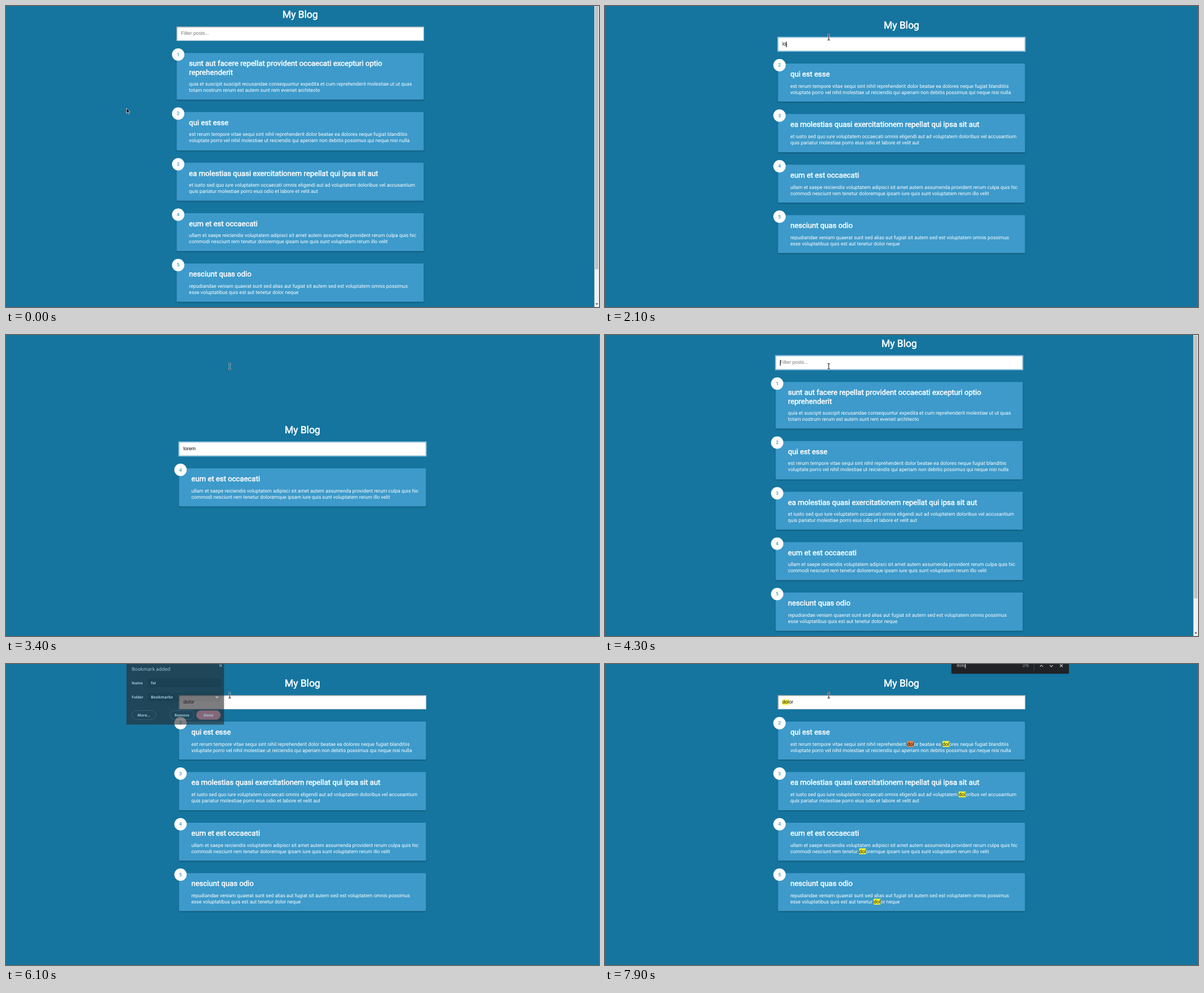
These frames come from a looping animation (1051x533 px, 8 s). An HTML page:

```html
<!DOCTYPE html>
<html lang="en">
<head>
<meta charset="utf-8">
<title>My Blog</title>
<style>
  :root { --bg: #15759f; --card: #3d9aca; --dark: #27282c; }
  * { box-sizing: border-box; }
  html, body { margin: 0; width: 100%; height: 100%; overflow: hidden; background: var(--bg); }

  /* laid out at 1920px wide, then scaled to the stage */
  #view {
    position: absolute; left: 0; top: 0; width: 1920px; height: 974px; overflow: hidden;
    transform: scale(.547396); transform-origin: 0 0;
    color: #fff; background: var(--bg);
    font: 16px Roboto, sans-serif; text-rendering: geometricPrecision;
  }
  #view > * { position: absolute; }

  #page { left: 0; top: 0; width: 800px; }
  h1, h2 { margin: 0; font-weight: 400; }
  h1 {
    padding-top: 9.5px; height: 47px; font-size: 32px; line-height: 37.5px;
    text-align: center; -webkit-text-stroke: 1.04px #fff;
  }
  #filter {
    display: flex; align-items: center; height: 45px; margin-top: 20px; padding: 0 12px;
    background: #fff; border: 2px solid; border-color: #9a9a9a #e4e4e4 #e4e4e4 #9a9a9a;
    color: #000; font: 16px/18px "Liberation Sans", Arial, sans-serif;
  }
  #filter.focus { border-color: #a9c6d8; box-shadow: 0 0 0 2px #5fa9d3; }
  #hint { color: #757575; }
  .typo { text-decoration: underline wavy #e02020 1px; text-underline-offset: 1px; }
  .caret { width: 1.6px; height: 18px; margin-right: -1.6px; background: currentColor; }

  .post {
    position: relative; margin-top: 40px; padding: 20px 20px 20px 40px; white-space: pre;
    background: var(--card); border-radius: 3px; box-shadow: 0 2px 4px rgba(0, 0, 0, .3);
  }
  .post h2 { font-size: 24px; line-height: 28px; -webkit-text-stroke: .87px #fff; }
  .post p { margin: 15px 0 0; line-height: 20.16px; }
  .post b {
    position: absolute; left: -15px; top: -15px; width: 40px; height: 40px; border-radius: 50%;
    background: #fff; color: var(--bg); font: 15px/40px Roboto, sans-serif; text-align: center;
  }
  mark { background: #fbf42f; color: #111; }
  mark.now { background: #e98245; }

  #scroll { left: 1905px; top: 0; width: 15px; height: 974px; background: #f1f1f1; }
  #scroll i { position: absolute; left: 2px; top: 1px; width: 11px; height: 851px; background: #c1c1c1; }
  #scroll u {
    position: absolute; left: 3.5px; top: 962px;
    border: 4px solid transparent; border-top: 5px solid #404040; border-bottom: 0;
  }

  #menu, #dialog, #find { font-family: "Noto Sans", sans-serif; background: var(--dark); }
  #menu {
    left: 551.5px; top: 114px; width: 192px; height: 232px; padding: 7px 0 0 10px;
    font-size: 13.5px; font-weight: 600; line-height: 36px;
    border-radius: 2px; box-shadow: 0 2px 4px rgba(0, 0, 0, .4);
  }
  #dialog { left: 390px; top: 0; width: 316px; height: 196px; font-size: 12px; font-weight: 600; }
  #dialog span { position: absolute; line-height: 28px; }
  #dialog .title { left: 17px; top: 2px; font-size: 15.5px; font-weight: 500; }
  #dialog .field { left: 70px; width: 236px; padding-left: 9px; background: #1f2023; border-radius: 3px; font-size: 12.5px; }
  #dialog .btn { top: 150px; width: 79px; text-align: center; border: 1px solid #70757a; border-radius: 15px; }
  #dialog .done { left: 226px; background: #d0605e; border-color: #d0605e; }
  #find {
    left: 1122px; top: -29px; width: 380px; height: 60px; background: #202226; color: #d8dadd;
    font-size: 13.5px; box-shadow: 0 1px 4px rgba(0, 0, 0, .4);
  }
  #find div { position: absolute; left: 16px; top: 24px; height: 20px; display: flex; align-items: center; }
  #find .count { left: 230px; color: #a4a8ac; }
  svg { position: absolute; left: 0; top: 0; overflow: visible; fill: none; stroke: #d0d3d6; stroke-width: 2; }
</style>
</head>
<body>
<div id="view">
  <div id="page">
    <h1>My Blog</h1>
    <div id="filter"><span id="query"></span><i class="caret" id="caret"></i><span id="hint">Filter posts...</span></div>
    <div id="posts"></div>
  </div>
  <div id="scroll"><i></i><u></u></div>
  <div id="menu">Lunasso<br>asasas<br>as<br>Natação<br>VoltaGin<br>Tovari</div>
  <div id="dialog">
    <span class="title">Bookmark added</span>
    <span style="left:17px;top:47px">Name</span><span class="field" style="top:47px">foi</span>
    <span style="left:17px;top:93px">Folder</span><span class="field" style="top:93px">Bookmarks</span>
    <span class="btn" style="left:17px">More…</span>
    <span class="btn" style="left:140px">Remove</span>
    <span class="btn done">Done</span>
    <svg width="316" height="196"><path d="M301 1l8 8m0-8l-8 8M289 105l4 4 4-4"/></svg>
  </div>
  <div id="find">
    <div><span id="needle"></span><i class="caret"></i></div>
    <div class="count" id="count">2/6</div>
    <svg width="380" height="60"><path d="M267 20V50" stroke="#4a4d52" stroke-width="1.5"/><path d="M286 38l5-5 5 5M318 33l5 5 5-5M351 30l9 9m0-9l-9 9"/></svg>
  </div>
  <svg id="arrow" width="14" height="21"><path d="M1 1V17L4.8 13.4 7.6 19.6 10.4 18.4 7.7 12.4H13Z" fill="#000" stroke="#fff" stroke-width="1.3"/></svg>
  <svg id="beam" width="10" height="18"><g id="bar"><path d="M-4 -8.5H4M-4 8.5H4M0 -8.5V8.5" stroke="#fff" stroke-width="4"/><path d="M-4 -8.5H4M-4 8.5H4M0 -8.5V8.5" stroke="#111" stroke-width="1.8"/></g></svg>
</div>
<script>
const LOOP = 8000, TICK = 100, STEP = 163.32;
const $ = id => document.getElementById(id);

const posts = [
  ['sunt aut facere repellat provident occaecati excepturi optio\nreprehenderit',
   'quia et suscipit suscipit recusandae consequuntur expedita et cum reprehenderit molestiae ut ut quas\ntotam nostrum rerum est autem sunt rem eveniet architecto'],
  ['qui est esse',
   'est rerum tempore vitae sequi sint nihil reprehenderit dolor beatae ea dolores neque fugiat blanditiis\nvoluptate porro vel nihil molestiae ut reiciendis qui aperiam non debitis possimus qui neque nisi nulla'],
  ['ea molestias quasi exercitationem repellat qui ipsa sit aut',
   'et iusto sed quo iure voluptatem occaecati omnis eligendi aut ad voluptatem doloribus vel accusantium\nquis pariatur molestiae porro eius odio et labore et velit aut'],
  ['eum et est occaecati',
   'ullam et saepe reiciendis voluptatem adipisci sit amet autem assumenda provident rerum culpa quis hic\ncommodi nesciunt rem tenetur doloremque ipsam iure quis sunt voluptatem rerum illo velit'],
  ['nesciunt quas odio',
   'repudiandae veniam quaerat sunt sed alias aut fugiat sit autem sed est voluptatem omnis possimus\nesse voluptatibus quis est aut tenetur dolor neque']
].map(([title, body], i) => ({ id: i + 1, title, body }));

// each track lists [time, value]; a value holds until the next entry
const tracks = {
  query: [[0, ''], [1800, 'l'], [2100, 'lo'], [2500, 'lor'], [2800, 'lore'], [3000, 'lorem'], [4300, ''],
          [4600, 'd'], [4700, 'do'], [4800, 'dol'], [5000, 'dolo'], [5500, 'dolor']],
  focus: [[0, false], [1300, true], [5900, false], [6800, true], [7300, false]],
  caret: [[0, false], [1300, true], [3400, false], [4100, true], [5600, false], [6800, true], [7300, false]],
  typo: [[0, false], [3800, true], [4300, false]],
  menu: [[0, 0], [1300, 1], [1800, .6], [1900, .2], [2000, 0]],
  dialog: [[0, 0], [5900, .2], [6000, .4], [6100, .6], [6200, .8], [6300, 1], [6700, .6], [6800, .18], [7000, 0]],
  needle: [[0, ''], [7600, 'do'], [7700, 'dol'], [7900, 'dolo']],
  mark: [[0, ''], [7700, 'do'], [7900, 'dol']],
  beam: [[0, false], [1000, true], [4100, false], [4300, true]]
};
const at = (name, t) => tracks[name].reduce((v, [time, next]) => t >= time ? next : v, '');
const clamp = v => Math.max(0, Math.min(1, v));
const move = (el, x, y) => { el.style.transform = `translate(${x}px, ${y}px)`; };
const show = (el, on) => { el.style.display = on ? '' : 'none'; };

const highlight = (text, word) => word ? text.replaceAll(word, `<mark>${word}</mark>`) : text;

function drawPage(query, word) {
  const found = posts.filter(p => (p.title + p.body).includes(query));
  const all = found.length === posts.length;
  $('posts').innerHTML = found.map(p =>
    `<div class="post"><b>${p.id}</b><h2>${p.title}</h2><p>${highlight(p.body, word)}</p></div>`).join('');
  $('posts').querySelector('mark')?.classList.add('now');
  $('query').innerHTML = highlight(query, word);
  show($('hint'), !query);
  show($('scroll'), all);
  // short lists are centred in the window
  move($('page'), all ? 552.5 : 560, all ? 0 : 34.3 + (4 - found.length) * STEP / 2);
}

function drawPointer(t) {
  const k = clamp(t / 900), e = k * k * (3 - 2 * k);
  const rest = t >= 1000;
  const x = rest ? 724.5 : 389 + (726 - 389) * e;
  const y = rest ? (t < 1100 ? 106 : 101.4) : 330 + (111 - 330) * e;
  const beam = at('beam', t);
  show($('beam'), beam);
  show($('arrow'), !beam);
  move($('beam'), x, y);
  move($('arrow'), x, y);
}

let lastKey, lastTick;
function render(t) {
  const query = at('query', t), word = at('mark', t), key = query + '|' + word;
  if (key !== lastKey) drawPage(query, word);
  lastKey = key;

  $('filter').classList.toggle('focus', at('focus', t));
  $('query').classList.toggle('typo', at('typo', t));
  show($('caret'), at('caret', t));
  $('menu').style.opacity = at('menu', t);
  $('dialog').style.opacity = at('dialog', t);

  $('needle').textContent = at('needle', t);
  show($('count'), word);
  show($('find'), t >= 7300);
  move($('find'), 0, -34 * (1 - clamp((t - 7200) / 300)));
  drawPointer(t);
}

const start = performance.now();
function frame() {
  const t = (performance.now() - start) % LOOP;
  const tick = Math.floor(t / TICK) * TICK;
  if (tick !== lastTick) render(lastTick = tick);
  requestAnimationFrame(frame);
}
frame();
</script>
</body>
</html>
```
